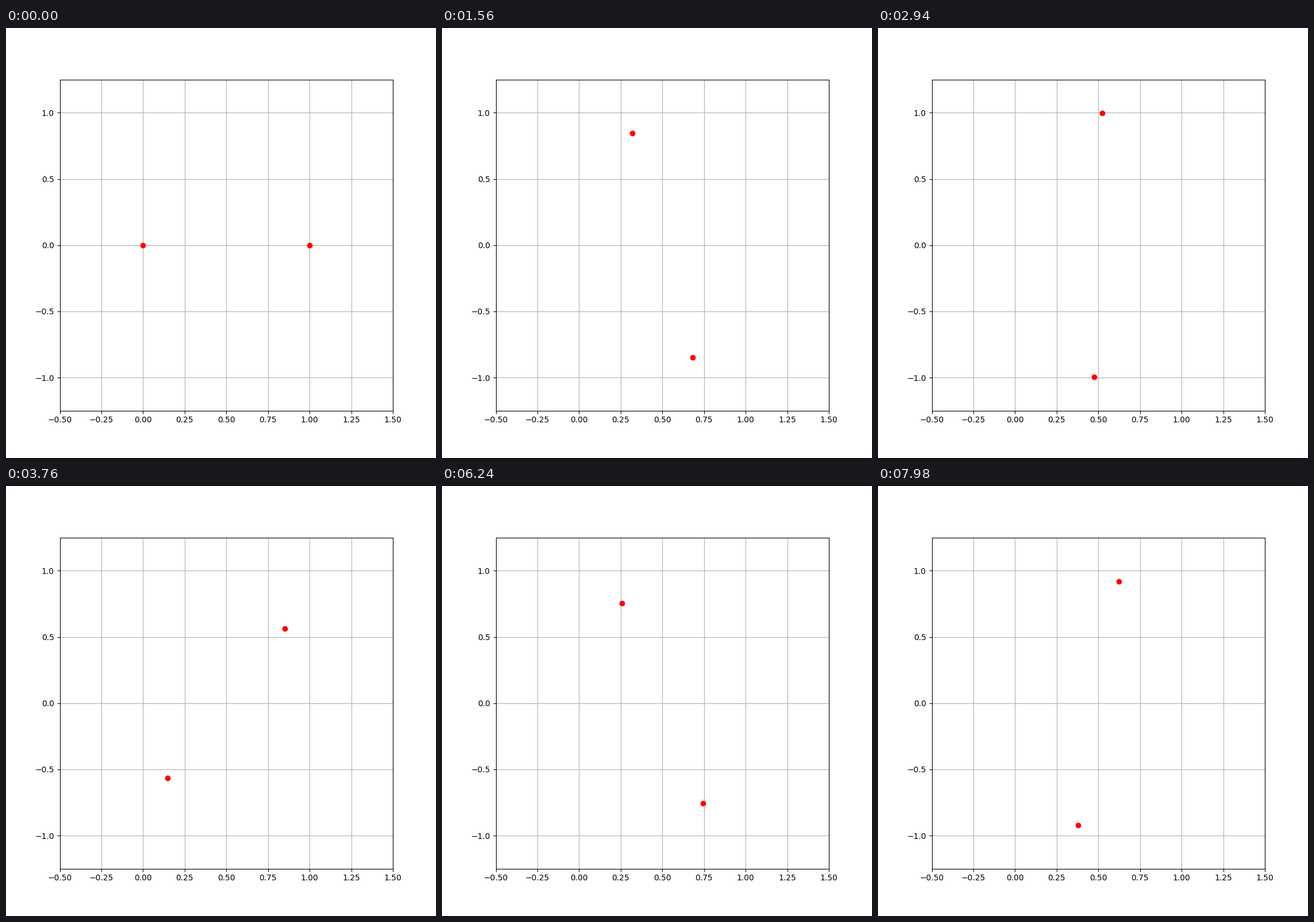
Write a matplotlib script that moves like this. It is 748 px wide and 748 px high and loops after 8 s.

```python
import numpy as np
import matplotlib.pyplot as plt
from matplotlib.animation import FuncAnimation

# Phase portrait (x, vx) of two equal masses orbiting their centre at x = 0.5.
FRAMES = 400
INTERVAL = 20                       # ms
DT = 0.01                           # simulated time per frame
MU = 2.0                            # G * (m1 + m2)
R0, V0 = 1.0, 1.0                   # separation and relative speed at the start

AXIS = 1 / (2 / R0 - V0**2 / MU)    # semi-major axis of the relative orbit
ECC = R0 / AXIS - 1                 # the start is the far point
RATE = np.sqrt(MU / AXIS**3)        # mean motion


def eccentric_anomaly(mean):
    mean = (mean + np.pi) % (2 * np.pi) - np.pi
    e = mean + ECC * np.sin(mean)
    for _ in range(12):
        e -= (e - ECC * np.sin(e) - mean) / (1 - ECC * np.cos(e))
    return e


def phase_points(time):
    """Positions and velocities along x of both masses."""
    e = eccentric_anomaly(np.pi + RATE * time)
    half_x = -AXIS * (np.cos(e) - ECC) / 2
    half_v = AXIS * RATE * np.sin(e) / (1 - ECC * np.cos(e)) / 2
    return [0.5 - half_x, 0.5 + half_x], [-half_v, half_v]


fig, ax = plt.subplots(figsize=(7.48, 7.48), dpi=100)
ax.set_xlim(-0.5, 1.5)
ax.set_ylim(-1.25, 1.25)
ax.set_xticks(np.arange(-0.5, 1.51, 0.25))
ax.set_yticks(np.arange(-1.0, 1.01, 0.5))
ax.grid(True)
dots, = ax.plot([], [], "ro")


def update(frame):
    dots.set_data(*phase_points(frame * DT))
    return dots,


anim = FuncAnimation(fig, update, frames=FRAMES, interval=INTERVAL,
                     repeat=True, repeat_delay=0, blit=False)
plt.show()
```
